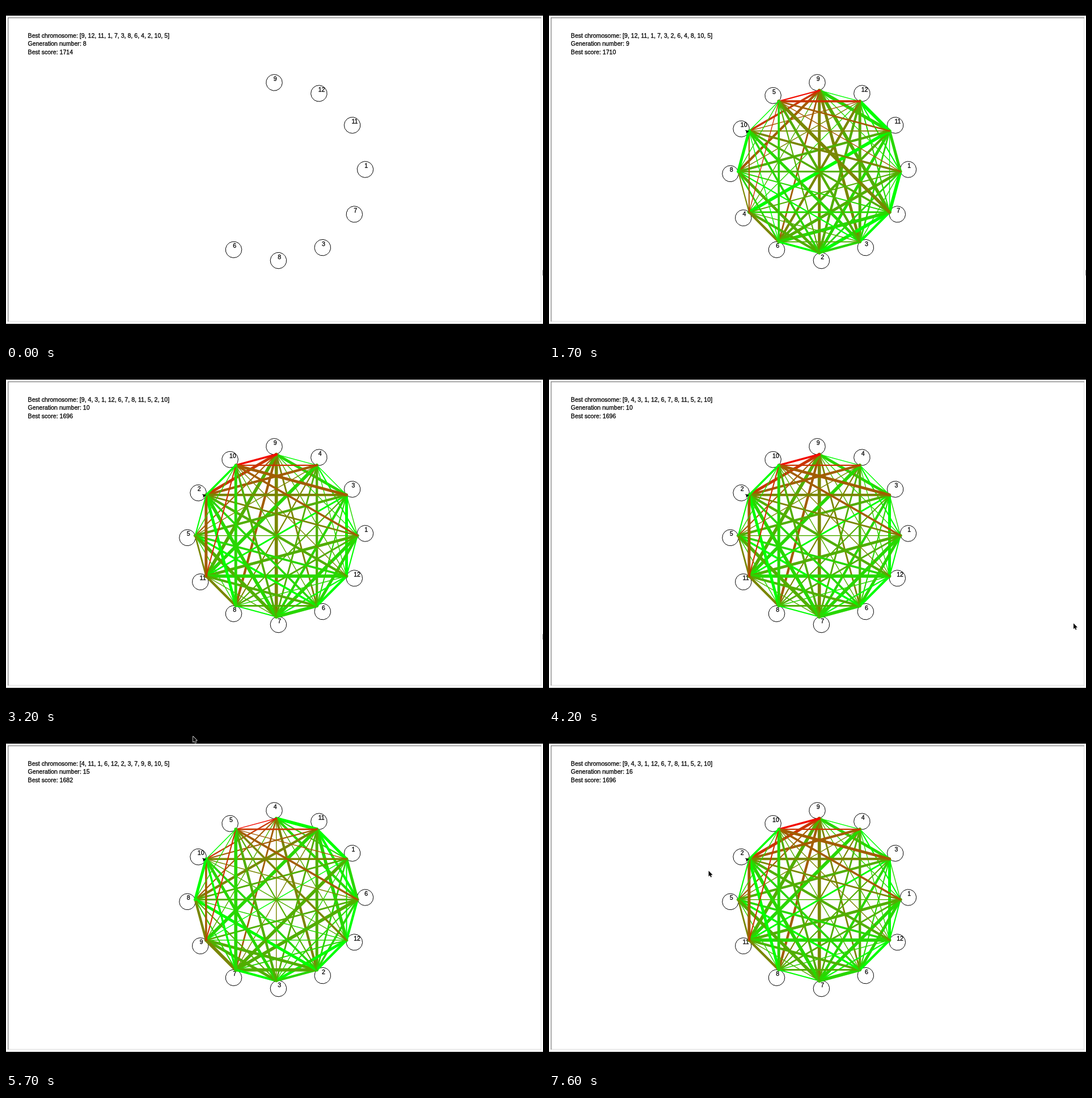
Animation of 947x592 px, one loop 7700 ms. Source, as an HTML page with a canvas:

```html
<!DOCTYPE html>
<html>
<head>
<meta charset="utf-8">
<style>
html, body { margin: 0; width: 947px; height: 592px; overflow: hidden; background: #000; }
canvas { display: block; }
</style>
</head>
<body>
<canvas id="stage" width="947" height="592"></canvas>
<script>
const g = document.getElementById('stage').getContext('2d');
const LOOP = 7700, STEP = 100, COUNT = 12;
const SCALE = 0.715, RAD = Math.PI / 180;
const TEXT_DELAY = 20, CIRCLE_MS = 45, LINE_MS = 2;

const early = [9, 12, 11, 1, 7, 3, 8, 6, 4, 2, 10, 5];
const swapped = early.map(n => n === 8 ? 2 : n === 2 ? 8 : n);
const late = [9, 4, 3, 1, 12, 6, 7, 8, 11, 5, 2, 10];
const best = [4, 11, 1, 6, 12, 2, 3, 7, 9, 8, 10, 5];

const RUNS = [
  { start: -380, gen: 8, score: 1714, order: early },
  { start: 990, gen: 9, score: 1710, order: swapped },
  { start: 2475, gen: 10, score: 1696, order: late },
  { start: 4840, gen: 15, score: 1682, order: best },
  { start: 6340, gen: 16, score: 1696, order: late }
];

// Mouse key points: time, x, y
const MOUSE = [
  [4100, 946.6, 465], [4900, 443.5, 31], [5400, 400, 3], [6400, 75, 9], [7600, 281.5, 241]
];

// Site distances are shortest paths over these roads (base 12 pairs)
const dist = Array.from({ length: COUNT }, (_, i) =>
  Array.from({ length: COUNT }, (_, j) => i === j ? 0 : Infinity));
for (const road of '01 12 13 24 28 34 45 46 59 67 7a 9a ab'.split(' ')) {
  const [a, b] = [...road].map(c => parseInt(c, COUNT));
  dist[a][b] = dist[b][a] = 1;
}
for (let k = 0; k < COUNT; k++)
  for (let i = 0; i < COUNT; i++)
    for (let j = 0; j < COUNT; j++)
      dist[i][j] = Math.min(dist[i][j], dist[i][k] + dist[k][j]);

// Seeded flow between two facilities, from 2 to 8
function flow(a, b) {
  const h = Math.sin(a * b * 12.9898 + (a + b) * 78.233) * 43758.5453;
  return 2 + Math.floor((h - Math.floor(h)) * 7);
}

// Point at an angle measured clockwise from the top
const polar = (x, y, r, deg) => [x + r * Math.sin(deg * RAD), y - r * Math.cos(deg * RAD)];
const site = i => polar(476.7, 291.7, 200 * SCALE, i * 30);

function path(points) {
  g.beginPath();
  points.forEach(p => g.lineTo(...p));
}

function label(text, x, y) {
  g.fillStyle = g.strokeStyle = '#000';
  g.lineWidth = 0.3;
  g.fillText(text, x, y);
  g.strokeText(text, x, y);
}

function drawWindow() {
  g.fillStyle = '#000';
  g.fillRect(0, 0, 947, 592);
  g.fillStyle = '#fff';
  g.fillRect(0, 17, 947, 543);
  g.fillStyle = '#ddd';
  g.fillRect(943, 20, 1, 537);
  g.fillRect(3, 555, 941, 1);
  g.fillStyle = '#8c8c8c';
  g.fillRect(3, 20, 941, 1.4);
  g.fillRect(3, 20, 1.4, 536);
}

function drawNode(i, name) {
  const [x, y] = polar(...site(i), 20 * SCALE, i * 30 - 15);
  path(Array.from({ length: 15 }, (_, k) => polar(x, y, 20 * SCALE, i * 30 + 165 - k * 24)));
  g.closePath();
  g.lineWidth = 1;
  g.strokeStyle = '#000';
  g.stroke();
  label(name, x - 1.2, y - 3);
}

function drawLink(i, j, order) {
  const red = Math.round((dist[i][j] - 1) / 6.3 * 255);
  path([site(i), site(j)]);
  g.lineWidth = flow(order[i], order[j]) * SCALE;
  g.strokeStyle = `rgb(${red},${255 - red},0)`;
  g.stroke();
}

function drawTurtle() {
  g.save();
  g.translate(...site(10));
  g.rotate(-15 * RAD);
  g.scale(SCALE, SCALE);
  path([[0, 0], [-9, -5], [-7, 0], [-9, 5]]);
  g.fillStyle = '#000';
  g.fill();
  g.restore();
}

function drawRun(run, t) {
  const age = t - run.start;
  if (age < TEXT_DELAY) return;
  g.font = '10.6px "Liberation Sans", Arial, sans-serif';
  g.lineCap = g.lineJoin = 'round';
  const lines = [
    `Best chromosome: [${run.order.join(', ')}]`,
    `Generation number: ${run.gen}`,
    `Best score: ${run.score}`
  ];
  lines.forEach((text, i) => label(text, 38.6, 55.5 + i * 14.9));

  const nodes = Math.min(COUNT, Math.floor(age / CIRCLE_MS));
  for (let i = 0; i < nodes; i++) drawNode(i, run.order[i]);

  let links = Math.floor((age - COUNT * CIRCLE_MS) / LINE_MS);
  for (let i = 1; i < COUNT; i++)
    for (let j = 0; j < i && links > 0; j++, links--) drawLink(i, j, run.order);
  if (links > 0) drawTurtle();
}

function drawMouse(t) {
  const k = Math.max(1, MOUSE.findIndex(key => t <= key[0]));
  const [t0, x0, y0] = MOUSE[k - 1], [t1, x1, y1] = MOUSE[k];
  const u = Math.max(0, (t - t0) / (t1 - t0));
  const ease = u * u * (3 - 2 * u);
  g.save();
  g.translate(x0 + (x1 - x0) * ease, y0 + (y1 - y0) * ease);
  path([[0, 0], [0, 10], [2.3, 8], [3.8, 11.4], [5.4, 10.7], [3.9, 7.4], [7, 7.2]]);
  g.closePath();
  g.lineWidth = 1.4;
  g.strokeStyle = '#fff';
  g.stroke();
  g.fillStyle = '#000';
  g.fill();
  g.restore();
}

function frame(now) {
  const t = Math.floor((now % LOOP) / STEP) * STEP;
  drawWindow();
  drawRun(RUNS.filter(run => run.start <= t).pop(), t);
  drawMouse(t);
  requestAnimationFrame(frame);
}
frame(0);
</script>
</body>
</html>
```
